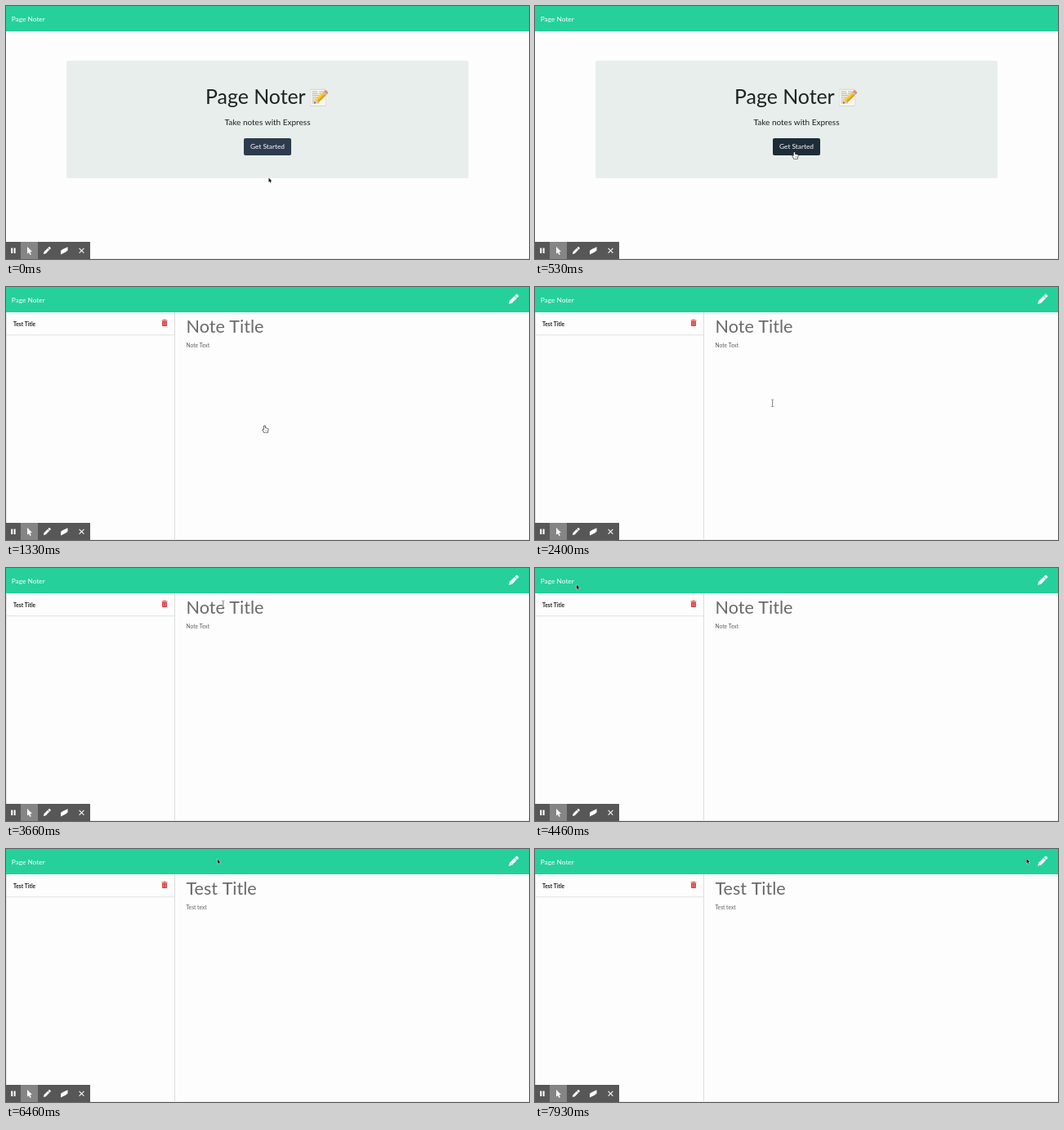
Recreate the animation shown at these times as an HTML page with a canvas. Size 640x310 px, loop 8 s.

```html
<!DOCTYPE html>
<html lang="en">
<head>
<meta charset="utf-8">
<title>Page Noter</title>
<style>
  html, body { margin: 0; width: 100%; height: 100%; overflow: hidden; background: #fdfdfd; }
  canvas { display: block; width: 640px; height: 310px; }
</style>
</head>
<body>
<canvas id="stage" width="640" height="310"></canvas>
<script>
const ctx = document.getElementById('stage').getContext('2d');
const LOOP = 8000;
const APP_NAME = 'Page Noter';
const OPEN_APP = 1330;
const OPEN_NOTE = 5200;

// Each move: start, end, number of steps, destination.
const START = { x: 321.5, y: 210.5 };
const MOVES = [
  [60, 730, 10, 317, 170],
  [2130, 2400, 5, 290.7, 142.3],
  [2800, 3060, 5, 280, 44],
  [3200, 3330, 3, 275, 46],
  [3660, 4130, 8, 61.5, 9.5],
  [4330, 4600, 5, 31, 41],
  [6000, 6460, 8, 258.7, 12.5],
  [6800, 7000, 4, 392.5, 60.5],
  [7200, 7400, 4, 543, 34.5],
  [7600, 7930, 6, 601.5, 12]
];
const CLICKS = [
  { at: 1130, until: OPEN_APP, x: 317, y: 171 },
  { at: 5000, until: OPEN_NOTE, x: 31, y: 45 }
];

const ease = p => p * p * (3 - 2 * p);

function pointerAt(t) {
  let { x, y } = START;
  for (const [t0, t1, steps, toX, toY] of MOVES) {
    if (t < t0) break;
    const gap = (t1 - t0) / (steps - 1);
    const step = t >= t1 ? steps : Math.floor((t - t0) / gap + 0.01) + 1;
    const p = ease(Math.min(1, step / steps));
    x += (toX - x) * p;
    y += (toY - y) * p;
  }
  return { x, y };
}

function overButton({ x, y }) {
  return x > 291 && x < 349 && y > 162 && y < 183;
}

function pointerKind(t, p) {
  if (t < OPEN_APP) return overButton(p) ? 'hand' : 'arrow';
  if (t < 2130) return 'hand';
  if (p.x < 206 && p.y > 31 && p.y < 59) return 'hand';
  return p.x > 215 && p.y > 36 ? 'beam' : 'arrow';
}

function rect(x, y, w, h, color, radius = 0) {
  ctx.fillStyle = color;
  ctx.beginPath();
  ctx.roundRect(x, y, w, h, radius);
  ctx.fill();
}

function text(value, x, y, size, color, { align = 'left', weight = 400 } = {}) {
  ctx.font = `${weight} ${size}px Lato, sans-serif`;
  ctx.textAlign = align;
  ctx.fillStyle = color;
  ctx.fillText(value, x, y);
}

function shape(points, fill, stroke, width = 1) {
  ctx.beginPath();
  for (let i = 0; i < points.length; i += 2) ctx.lineTo(points[i], points[i + 1]);
  ctx.closePath();
  paint(fill, stroke, width);
}

function paint(fill, stroke, width = 1) {
  if (stroke) {
    ctx.strokeStyle = stroke;
    ctx.lineWidth = width;
    ctx.lineJoin = 'round';
    ctx.stroke();
  }
  if (fill) {
    ctx.fillStyle = fill;
    ctx.fill();
  }
}

function line(x0, y0, x1, y1, color, width = 1) {
  ctx.beginPath();
  ctx.moveTo(x0, y0);
  ctx.lineTo(x1, y1);
  paint(null, color, width);
}

function at(x, y, draw, angle = 0, scale = 1) {
  ctx.save();
  ctx.translate(x, y);
  ctx.rotate(angle);
  ctx.scale(scale, scale);
  draw();
  ctx.restore();
}

// A pen pointing down-left, with its tip at the local origin.
function pen(x, y, scale, color, gapColor) {
  at(x, y, () => {
    shape([0, 0, 3.4, -1.9, 11, -1.9, 11, 1.9, 3.4, 1.9], color);
    rect(11.7, -1.9, 3, 3.8, color, [0, 1, 1, 0]);
    if (gapColor) line(4.5, 0, 10, 0, gapColor, 0.5);
  }, -Math.PI / 4, scale);
}

function memoIcon() {
  at(372, 101, () => {
    rect(0, 0.5, 19.5, 21.5, '#d5d5d0', 1);
    rect(0.5, 0.5, 18.5, 20.5, '#f6f5ef', 1);
    rect(0.5, 0.5, 18.5, 1.5, '#dedcd3', 1);
    for (let i = 0; i < 7; i++) {
      const y = 4 + i * 2.3;
      line(2.5, y, 9 + (i * 5) % 4, y, '#a2a29f', 0.8);
      if (i < 3) line(11, y, 16 - i, y, '#aaa9a5', 0.8);
    }
  });
  at(377, 119.5, () => {
    shape([0, 0, 5, -2.7, 5, 2.7], '#e8c99b');
    shape([0, 0, 2, -1.1, 2, 1.1], '#444');
    rect(5, -2.7, 12, 5.4, '#f4c025');
    rect(5, 0.8, 12, 1.9, '#d99b17');
    rect(5, -2.7, 12, 1.4, '#fbd95a');
    rect(17, -2.7, 2, 5.4, '#b9bcb9');
    rect(19, -2.7, 3, 5.4, '#e58a7c', [0, 1.5, 1.5, 0]);
  }, -0.76);
}

function header() {
  rect(0, 0, 640, 31, '#25d09b');
  text(APP_NAME, 6.7, 18.5, 8.33, '#fff');
}

function homePage(hover, pressed) {
  rect(74, 67, 492, 144, '#e8eeec', 2);
  text(APP_NAME, 244, 119.5, 24.89, '#1c2321');
  memoIcon();
  text('Take notes with Express', 320, 145.5, 10, '#1c2321', { align: 'center' });
  if (pressed) rect(290, 161, 60, 23, '#b3bcbf', 2.5);
  rect(291, 162, 58, 21, pressed ? '#17232b' : hover ? '#1e2c38' : '#2c3b4d', 2);
  text('Get Started', 320, 175.4, 8.33, '#fff', { align: 'center' });
}

function trashIcon() {
  rect(190.5, 40.4, 7, 1.2, '#dc3d41', 0.4);
  rect(192.5, 39.8, 3, 1, '#dc3d41', 0.4);
  rect(191, 42, 6, 6, '#dc3d41', [0, 0, 0.8, 0.8]);
  for (const x of [192.5, 194, 195.5]) line(x, 43, x, 47, '#f0a5a7', 0.5);
}

function notesPage(noteOpen) {
  pen(615.2, 20.8, 1.08, '#fff');
  line(0.5, 31, 0.5, 310, '#e0e0e0');
  line(206.5, 31, 206.5, 310, '#dedede');
  line(0, 58.8, 206, 58.8, '#e0e0e0');
  text('Test Title', 9, 47.5, 6.67, '#202020', { weight: 700 });
  trashIcon();
  text(noteOpen ? 'Test Title' : 'Note Title', 220.5, 56.2, 21.6, '#696969');
  text(noteOpen ? 'Test text' : 'Note Text', 220.5, 73.5, 6.67, '#606060');
}

function toolbar() {
  line(103, 309.5, 640, 309.5, '#ededed');
  rect(0, 289, 103, 21, '#575757');
  rect(18, 289, 21, 21, '#858585');
  rect(6.2, 296.5, 2, 6.5, '#fff');
  rect(9.6, 296.5, 2, 6.5, '#fff');
  shape([26, 295, 26, 303.6, 28, 301.9, 29.4, 305, 30.8, 304.3, 29.4, 301.3, 32, 301], '#fff');
  pen(45.8, 304, 0.8, '#fff');
  shape([67, 304.5, 67, 299.8, 69.5, 298, 75.5, 295.3, 75.5, 299.5, 73, 301.6], '#fff');
  line(89.6, 296.8, 95.4, 302.6, '#fff', 1.1);
  line(95.4, 296.8, 89.6, 302.6, '#fff', 1.1);
}

const pointers = {
  arrow() {
    shape([0, 0, 0, 5.4, 1.3, 4.3, 2.1, 6.3, 3, 5.9, 2.2, 4, 3.9, 3.9], '#111', '#fff', 0.9);
  },
  hand() {
    ctx.beginPath();
    ctx.moveTo(-1.3, 5);
    ctx.lineTo(-1.3, 0.8);
    ctx.quadraticCurveTo(-0.6, -0.3, 0.2, 0.8);
    ctx.lineTo(0.2, 3);
    ctx.lineTo(3.2, 3.6);
    ctx.quadraticCurveTo(4, 4, 3.8, 5.2);
    ctx.lineTo(3, 8.4);
    ctx.lineTo(-0.8, 8.4);
    ctx.lineTo(-2.9, 5.2);
    ctx.quadraticCurveTo(-2.6, 4, -1.3, 5);
    ctx.closePath();
    paint('#fff', '#222', 1.3);
    for (const x of [0.4, 1.6, 2.6]) line(x, 5.4, x, 7.2, '#777', 0.4);
  },
  beam() {
    line(0, -3.8, 0, 3.8, '#fff', 1.8);
    line(0, -3.6, 0, 3.6, '#555', 0.8);
    line(-1.5, -4.2, 1.5, -4.2, '#666', 0.7);
    line(-1.5, 4.2, 1.5, 4.2, '#666', 0.7);
  }
};

function clickRing(t) {
  for (const { at: start, until, x, y } of CLICKS) {
    if (t < start || t >= until) continue;
    const step = Math.floor((t - start) / 65);
    ctx.beginPath();
    ctx.arc(x, y, Math.min(14, 8 + step * 3), 0, Math.PI * 2);
    paint(null, '#df5a62', 1.5);
  }
}

function draw(t) {
  const pointer = pointerAt(t);
  rect(0, 0, 640, 310, '#fdfdfd');
  header();
  if (t < OPEN_APP) homePage(overButton(pointer), t >= CLICKS[0].at);
  else notesPage(t >= OPEN_NOTE);
  toolbar();
  at(pointer.x, pointer.y, pointers[pointerKind(t, pointer)]);
  clickRing(t);
}

const began = performance.now();
function tick() {
  draw((performance.now() - began) % LOOP);
  requestAnimationFrame(tick);
}
tick();
</script>
</body>
</html>
```
